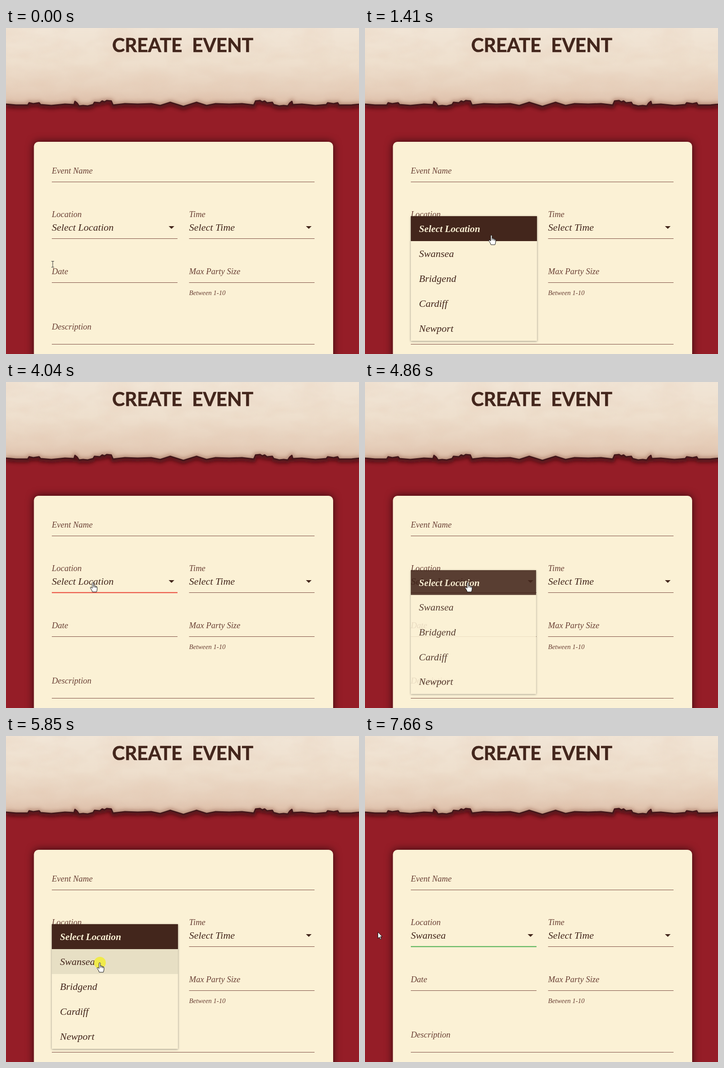
Recreate the animation shown at these times as an HTML page. Size 778 px wide and 719 px high, loop 8000 ms.

```html
<!DOCTYPE html>
<html lang="en">
<head>
<meta charset="utf-8">
<title>Create event</title>
<style>
html, body { margin: 0; width: 100%; height: 100%; overflow: hidden; background: #951d27; }
svg { display: block; font: italic 18.5px "Liberation Serif", serif; }
.title { font: bold 42px Lato, sans-serif; fill: #43261c; stroke: #43261c; stroke-width: .7; }
.label { fill: #6a4035; }
.value { font-size: 22px; fill: #43261c; }
.hint { font-size: 14.7px; fill: #6a4035; }
.chosen { font-weight: bold; font-size: 21.2px; fill: #fbf1d5; }
.line { stroke: #7a4a40; }
.card { filter: drop-shadow(0 0 9px #000a); }
.sheet { filter: drop-shadow(0 1px 2px #0006); }
</style>
</head>
<body>
<svg width="778" height="719" viewBox="0 0 778 719">
  <defs>
    <linearGradient id="paper" x2="0" y2="1">
      <stop offset="0" stop-color="#f1e5d6"/>
      <stop offset=".45" stop-color="#eedfcd"/>
      <stop offset=".8" stop-color="#e6cfbb"/>
      <stop offset="1" stop-color="#dcbda7"/>
    </linearGradient>
    <filter id="soft" x="-10%" y="-200%" width="120%" height="500%"><feGaussianBlur stdDeviation="4"/></filter>
    <filter id="mottle">
      <feTurbulence type="fractalNoise" baseFrequency=".014 .03" numOctaves="3" seed="4"/>
      <feColorMatrix values="0 0 0 0 .75  0 0 0 0 .5  0 0 0 0 .36  .7 0 0 0 -.26"/>
    </filter>
    <clipPath id="torn"><path class="scroll"/></clipPath>
  </defs>
  <rect width="778" height="719" fill="#951d27"/>
  <path class="edge" fill="none" stroke="#2a080d" stroke-width="8" opacity=".75" transform="translate(0 3)" filter="url(#soft)"/>
  <path class="scroll" fill="url(#paper)"/>
  <g clip-path="url(#torn)">
    <rect width="778" height="176" filter="url(#mottle)" opacity=".5"/>
    <path class="edge" fill="none" stroke="#905a48" stroke-width="8" opacity=".6" filter="url(#soft)"/>
  </g>
  <path class="edge" fill="none" stroke="#42171a" stroke-width="3" stroke-linejoin="round"/>
  <text class="title" x="234" y="53">CREATE</text>
  <text class="title" x="410" y="53">EVENT</text>
  <rect class="card" x="61.5" y="251" width="659.5" height="500" rx="10" fill="#fbf1d5"/>
  <g id="form"></g>
  <text id="place" class="value" x="101" y="447"></text>
  <path id="status" d="M101 464.5H378"/>
  <g id="menu">
    <rect class="sheet" width="278" height="275" fill="#fbf1d5"/>
    <rect id="hover" y="55" width="278" height="55" fill="#e7dfc4"/>
    <rect id="mark" width="278" height="55" fill="#43261c"/>
  </g>
  <g id="pointer" stroke-linejoin="round">
    <circle id="click" r="13" fill="#f1eb38" opacity=".87"/>
    <path id="shape"/>
  </g>
</svg>
<script>
const $ = id => document.getElementById(id);
const set = (el, attrs) => { for (const k in attrs) el.setAttribute(k, attrs[k]); return el; };
const add = (parent, tag, attrs, text = '') => {
  const el = set(document.createElementNS('http://www.w3.org/2000/svg', tag), attrs);
  el.textContent = text;
  return parent.appendChild(el);
};

// Torn edge: the left half, mirrored about x = 391
const half = [[0,168],[22,170],[48,170],[51,165],[60,167],[73,165],[76,169],[100,171],[130,168],
  [150,169],[152,162],[157,166],[161,172],[170,171],[180,172],[192,169],[195,164],[207,165],[212,161],
  [217,163],[222,160],[232,161],[236,170],[262,167],[290,168],[320,167],[340,171],[362,164],[391,173]];
const edge = [...half, ...half.slice(0, -1).reverse().map(([x, y]) => [782 - x, y])].join('L');
document.querySelectorAll('.edge').forEach(p => set(p, { d: 'M' + edge }));
document.querySelectorAll('.scroll').forEach(p => set(p, { d: `M0 0L${edge}V0Z` }));

const write = (kind, x, y, text) => add($('form'), 'text', { class: kind, x, y }, text);
const rule = (x1, x2, y) => add($('form'), 'path', { class: 'line', d: `M${x1} ${y}H${x2}` });
const caret = x => add($('form'), 'path', { d: `M${x} 437h12.5l-6.2 6z`, fill: '#43261c' });
write('label', 101, 321, 'Event Name');
write('label', 101, 417, 'Location');
write('label', 403.5, 417, 'Time');
write('value', 403.5, 447, 'Select Time');
write('label', 101, 543, 'Date');
write('label', 403.5, 543, 'Max Party Size');
write('hint', 403.5, 589, 'Between 1-10');
write('label', 101, 665, 'Description');
rule(101, 680, 339.5);
rule(403.5, 680, 464.5);
rule(101, 378, 561.5);
rule(403.5, 680, 561.5);
rule(101, 680, 697.5);
caret(358.5);
caret(661);

const options = ['Select Location', 'Swansea', 'Bridgend', 'Cardiff', 'Newport'].map((name, i) =>
  add($('menu'), 'text', { x: 18, y: 35 + 55 * i }, name));

const shapes = {
  beam: { d: 'M-3-6.5H3M0-6.5V6.5M-3 6.5H3', fill: 'none', stroke: '#333' },
  arrow: { d: 'M.5.5V14.5L3.7 11.5L6 16.5L8 15.6L5.8 10.7H10Z', fill: '#fff', stroke: '#111' },
  hand: {
    d: 'M-2 13V1.5Q-2 0-.5 0T1 1.5V7Q3.5 6 4 8Q6 7.2 6.5 9Q9 8.5 9 11V15Q8.5 18 7.5 21H-1.5Q-2.5 17-6 12.5Q-6.5 10-4 10.5ZM1 7V11M4 8V11.5M6.5 9V12',
    fill: '#fff', stroke: '#111'
  }
};

// Each key holds until the next: time, then values
const pointerKeys = [
  [0, 'beam', 103, 521], [190, 'arrow', 150, 503], [400, 'hand', 235, 464], [610, 'hand', 279, 457],
  [1810, 'hand', 258, 452], [2020, 'hand', 130, 437], [2230, 'arrow', 57, 439],
  [4040, 'hand', 192, 442], [4250, 'hand', 227, 442],
  [5240, 'hand', 226, 457], [5440, 'hand', 216, 478], [5630, 'hand', 207, 500],
  [6050, 'arrow', 207, 500], [7260, 'arrow', 175, 488], [7460, 'arrow', 80, 450], [7660, 'arrow', 28, 432]
];
const menuKeys = [
  [0, 0, 0], [1220, .993, .88], [1410, 1, 1], [2840, .705, .57], [3040, 0, 0],
  [4860, .993, .88], [5060, 1, 1], [6050, .705, .57], [6250, 0, 0]
];
const statusKeys = [[0, '#7a4a40', 1], [2840, '#ea4335', 2], [4860, '#7a4a40', 1], [6050, '#4caf50', 2]];
const clicks = [[1020, 1220], [2630, 2840], [4660, 4860], [5850, 6050]];
const at = (keys, t) => keys.findLast(k => k[0] <= t);

function draw(t) {
  const [, kind, x, y] = at(pointerKeys, t);
  const [, scale, alpha] = at(menuKeys, t);
  const [, stroke, width] = at(statusKeys, t);
  const chosen = t >= 6050 ? 1 : 0;

  set($('pointer'), { transform: `translate(${x} ${y})` });
  set($('shape'), shapes[kind]);
  set($('click'), { visibility: clicks.some(([a, b]) => t >= a && t < b) ? 'visible' : 'hidden' });
  set($('status'), { stroke, 'stroke-width': width });
  $('place').textContent = options[chosen].textContent;

  set($('menu'), { transform: `translate(101 415) scale(${scale})`, opacity: alpha });
  set($('hover'), { visibility: t >= 5440 && t < 6050 ? 'visible' : 'hidden' });
  set($('mark'), { y: 55 * chosen });
  options.forEach((o, i) => set(o, { class: i === chosen ? 'chosen' : 'value' }));
}

function loop() {
  draw(performance.now() % 8000);
  requestAnimationFrame(loop);
}
loop();
</script>
</body>
</html>
```
